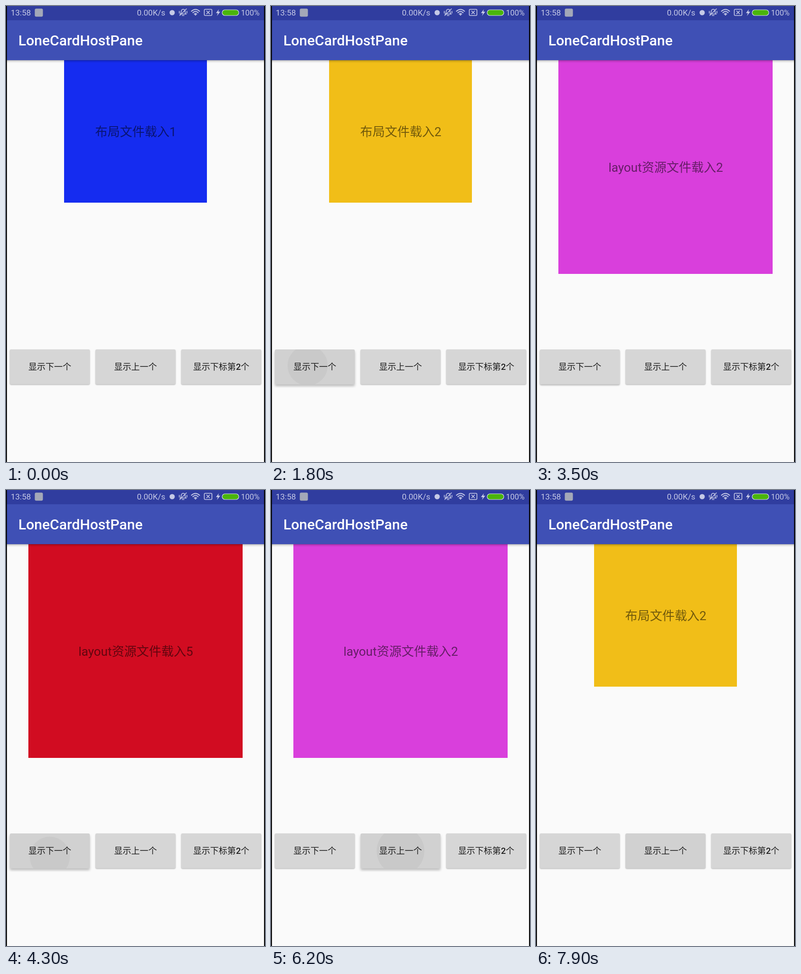
Recreate the animation shown at these times as an HTML page. Size 544x960 px, loop 8000 ms.

```html
<!DOCTYPE html>
<html lang="zh-CN">
<head>
<meta charset="utf-8">
<style>
html, body { margin: 0; width: 100%; height: 100%; overflow: hidden; background: #fafafa; }
svg { display: block; width: 544px; height: 960px; }
text { font-family: Roboto, "Noto Sans CJK SC", "Noto Sans CJK", sans-serif; }
.mid { text-anchor: middle; }
.status { fill: #c5c9e6; font-size: 17px; }
.line { fill: none; stroke: #c5c9e6; stroke-width: 1.6; stroke-linecap: round; }
</style>
</head>
<body>
<svg viewBox="0 0 544 960">
  <defs>
    <linearGradient id="fade" x2="0" y2="1">
      <stop offset="0" stop-opacity=".29"/>
      <stop offset=".4" stop-opacity=".11"/>
      <stop offset="1" stop-opacity="0"/>
    </linearGradient>
    <clipPath id="row"><path d="M2 716H542V804H2Z"/></clipPath>
  </defs>
  <rect width="544" height="960" fill="#fafafa"/>
  <rect id="card" y="114"/>
  <text id="label" class="mid" x="272.500" font-size="26" fill-opacity=".53"></text>
  <g id="buttons" clip-path="url(#row)"></g>

  <rect y="114" width="544" height="6" fill="url(#fade)"/>
  <rect width="544" height="114" fill="#3f50b5"/>
  <rect width="544" height="30" fill="#303d9f"/>
  <text x="26" y="83" font-size="30" font-weight="500" fill="#fff">LoneCardHostPane</text>

  <text class="status" x="10" y="20">13:58</text>
  <rect x="60.500" y="5.500" width="17" height="17" rx="3" fill="#a3a8b8"/>
  <text class="status" x="275" y="20">0.00K/s</text>
  <circle cx="349" cy="14" r="5.500" fill="#c5c9e6"/>
  <g class="line">
    <path d="M366 17Q368 15 368 11Q369 7 372 7Q376 7 376 11Q376 15 378 17ZM370 20H374M364 11V15M380 11V15M365 20L379 6"/>
    <path d="M389.500 11Q398 3.500 406.500 11M392.500 14Q398 9 403.500 14M395.500 17Q398 15 400.500 17" stroke-width="2"/>
    <rect x="416.500" y="7" width="16" height="13" rx="2"/>
    <path d="M421.500 10.500L427.500 16.500M427.500 10.500L421.500 16.500"/>
  </g>
  <circle cx="398" cy="18.500" r="1.500" fill="#c5c9e6"/>
  <path d="M447 7L441 15H445L443 21L450 12H446Z" fill="#c5c9e6"/>
  <rect x="454" y="8" width="35" height="12" rx="6" fill="#4ab50c" stroke="#d5d9ee" stroke-width="1.200"/>
  <text class="status" x="493.500" y="20" style="font-size:16.200px">100%</text>

  <path d="M0 0H2V960H0ZM542 0H544V960H542Z"/>
</svg>
<script>
const $ = id => document.getElementById(id);
const clamp = v => Math.max(0, Math.min(1, v));

// fill, side, caption
const pages = [
  ['#152cf0', 300, '布局文件载入1'],
  ['#f1be18', 300, '布局文件载入2'],
  ['#d93fdc', 450, 'layout资源文件载入2'],
  ['#23b120', 450, 'Activity setText 4'],
  ['#d10c21', 450, 'layout资源文件载入5']
];

// touch time, button, page shown, touch x, touch y
const taps = [
  [1690, 0, 1, 77, 757],
  [2630, 0, 2, 84, 762],
  [3480, 0, 3, 88, 766],
  [4190, 0, 4, 92, 772],
  [5230, 1, 3, 270, 762],
  [6050, 1, 2, 272, 760],
  [7520, 1, 1, 272, 760]
];

const bold = '<tspan font-weight="500">2</tspan>';
$('buttons').innerHTML = ['显示下一个', '显示上一个', `显示下标第${bold}个`].map((name, i) => {
  const x = 8 + 180 * i;
  const box = `x="${x}" y="723" width="168" height="73.500" rx="3"`;
  return `<clipPath id="clip${i}"><rect ${box}/></clipPath>
    <rect id="base${i}" ${box} fill="#d6d6d6"/>
    <g clip-path="url(#clip${i})"><rect id="tint${i}" ${box}/><circle id="ripple${i}"/></g>
    <text class="mid" x="${x + 84}" y="766" font-size="18" fill-opacity=".87">${name}</text>`;
}).join('');

function set(el, attrs) {
  for (const key in attrs) el.setAttribute(key, attrs[key]);
}

function drawButton(i, t) {
  const [start, , , cx, cy] = taps.findLast(tap => tap[1] === i && tap[0] <= t) || [-9999, 0, 0, 0, 0];
  const age = t - start;
  const lift = clamp(age / 70) * clamp((320 - age) / 120);
  const fade = clamp((age - 60) / 50) * clamp((500 - age) / 300);
  $('base' + i).style.filter =
    `drop-shadow(0 ${1.5 + 2.5 * lift}px ${1.3 + 1.5 * lift}px rgba(0,0,0,${0.3 - 0.06 * lift}))`;
  set($('tint' + i), { 'fill-opacity': 0.022 * fade });
  set($('ripple' + i), { cx, cy, r: 20 + 0.2 * Math.min(age, 500), 'fill-opacity': 0.04 * fade });
}

function draw(t) {
  const last = taps.findLast(tap => tap[0] + 60 <= t);
  const [fill, side, caption] = pages[last ? last[2] : 0];
  set($('card'), { x: 272 - side / 2, width: side, height: side, fill });
  set($('label'), { y: 124 + side / 2 });
  $('label').textContent = caption;
  for (let i = 0; i < 3; i++) drawButton(i, t);
}

function frame() {
  draw(performance.now() % 8000);
  requestAnimationFrame(frame);
}
frame();
</script>
</body>
</html>
```
